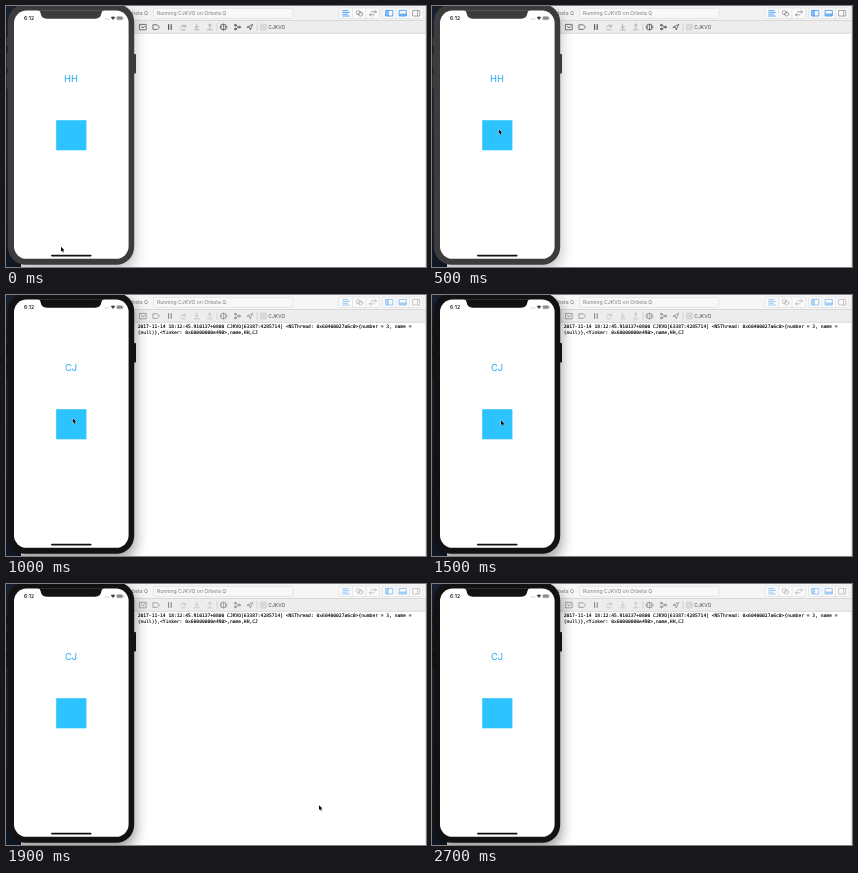
Recreate the animation shown at these times as an HTML page. Size 420x261 px, loop 3000 ms.

```html
<!DOCTYPE html>
<html lang="en">
<head>
<meta charset="utf-8">
<title>Observer demo</title>
<style>
  html, body { margin: 0; width: 100%; height: 100%; overflow: hidden; background: #fff; }
  svg { display: block; width: 100vw; height: 100vh; }
  text { font-family: Inter, Roboto, "Liberation Sans", sans-serif; white-space: pre; }
  .mono { font: 4.65px "DejaVu Sans Mono", "Liberation Mono", monospace; fill: #000; stroke: #000; stroke-width: .1; }
  .line { fill: none; stroke: #5a5a5a; stroke-width: .8; stroke-linejoin: round; stroke-linecap: round; }
  .dim { stroke: #a2a2a2; }
  .blue { stroke: #3494f4; }
  .gray { stroke: #929292; }
  .case { fill: #3c3c3c; }
  .bar { fill: #f2f2f2; }
  .shadow { opacity: .24; }
  .active .case { fill: #121212; }
  .active .bar { fill: #f6f6f6; }
  .active .shadow { opacity: .4; }
  .active .icons { opacity: .62; }
</style>
</head>
<body>
<svg id="stage" viewBox="0 0 420 261">
  <defs>
    <filter id="blur" x="-40%" y="-20%" width="180%" height="140%"><feGaussianBlur stdDeviation="7"/></filter>
    <linearGradient id="desk" x1="0" y1="0" x2="0" y2="1">
      <stop offset="0" stop-color="#1a2232"/>
      <stop offset=".45" stop-color="#1f2838"/>
      <stop offset="1" stop-color="#121a29"/>
    </linearGradient>
  </defs>

  <!-- desktop and editor window -->
  <rect width="16" height="261" fill="url(#desk)"/>
  <rect x="15" width="405" height="261" fill="#fff"/>
  <rect class="bar" x="15" width="405" height="14.5"/>
  <rect x="15" y="14.5" width="405" height="12.5" fill="#ededed"/>
  <path d="M15 14.5H420M15 27.3H420" stroke="#d2d2d2" stroke-width=".8"/>
  <path d="M419.6 0V261" stroke="#d2d2d2" stroke-width=".8"/>

  <!-- title bar -->
  <text x="142" y="9.4" font-size="5.1" fill="#777" text-anchor="end">Orbeta Q</text>
  <rect x="147.5" y="2.3" width="139.5" height="10" rx="1.5" fill="#f8f8f8" stroke="#dedede" stroke-width=".7"/>
  <text x="151" y="9.4" font-size="5.1" fill="#7b7b7b">Running CJKVO on Orbeta Q</text>
  <g fill="#fafafa" stroke="#dcdcdc" stroke-width=".6">
    <rect x="333" y="2" width="40.5" height="10.5" rx="1.5"/>
    <rect x="376.5" y="2" width="40.5" height="10.5" rx="1.5"/>
    <path d="M346.5 2V12.5M360 2V12.5M390 2V12.5M403.5 2V12.5"/>
  </g>
  <g class="icons">
    <path class="line blue" d="M336.7 4.6H342M336.7 6.4H343.5M336.7 8.2H341.5M336.7 10H343.5"/>
    <g class="line gray">
      <circle cx="352.3" cy="6.6" r="2.1"/><circle cx="354.6" cy="8" r="2.1"/>
      <path d="M363.5 8.8H368M363.5 8.8l1.5-1.4M363.5 8.8l1.5 1.4M365.5 5.8H370.4M370.4 5.8l-1.5-1.4M370.4 5.8l-1.5 1.4"/>
    </g>
    <g id="panels"></g>
  </g>

  <!-- debug bar -->
  <g class="line icons">
    <rect x="133.8" y="18.4" width="6.4" height="5.4"/>
    <path d="M135.4 20.2L137 22L138.6 20.2"/>
    <path d="M147.3 18.8H151.3L153.5 21.1L151.3 23.4H147.3Z"/>
    <path d="M162.6 18.7V23.5M165.2 18.7V23.5" stroke-width="1.2"/>
    <path class="dim" d="M174.7 21.2Q177 17 179.3 20.8M179.4 18.8V20.9H177.4M175.2 23.8H179"/>
    <path class="dim" d="M190.7 18V22M189.2 20.6L190.7 22.1L192.2 20.6M188.3 23.8H193.1"/>
    <path class="dim" d="M203.8 22.2V18M202.3 19.5L203.8 18L205.3 19.5M201.4 23.8H206.2"/>
    <path d="M215.6 18.7H219.6V23.5H215.6ZM214.4 20V22.2M220.8 20V22.2M217.6 17.8V24.4"/>
    <path d="M229.8 19.2L232.8 21.1L229.8 23M229.8 19.2H228.6M229.8 23H228.6M232.8 21.1H234"/>
    <circle cx="229.4" cy="19.2" r=".9"/><circle cx="229.4" cy="23" r=".9"/><circle cx="233.5" cy="21.1" r=".9"/>
    <path d="M241.2 21.2L246.8 18.2L244.2 24L243.7 21.6Z"/>
  </g>
  <path d="M211 17V25M251 17V25" stroke="#c6c6c6" stroke-width=".7"/>
  <rect x="254.3" y="18" width="6.2" height="6.2" rx=".8" fill="#d9d9d9" stroke="#c8c8c8" stroke-width=".5"/>
  <text x="262.3" y="23" font-size="5" fill="#4c4c4c">CJKVO</text>

  <!-- console output -->
  <g id="log">
    <text class="mono" x="131.7" y="33.2">2017-11-14 18:12:45.910137+0800 CJKVO[63387:4285714] &lt;NSThread: 0x60400027a6c0&gt;{number = 3, name =</text>
    <text class="mono" x="131.7" y="38.9">(null)},&lt;Yinker: 0x60000000e490&gt;,name,HH,CJ</text>
  </g>

  <!-- phone -->
  <rect class="shadow" x="2" y="3" width="127" height="263" rx="18" filter="url(#blur)"/>
  <g class="case">
    <rect x="127" y="48" width="3" height="19.5" rx=".8"/>
    <rect x=".6" y="31" width="3" height="9" rx=".8"/>
    <rect x=".6" y="47" width="3" height="16" rx=".8"/>
    <rect x=".6" y="67" width="3" height="16" rx=".8"/>
    <rect x="1.8" y="-2" width="126.4" height="260.8" rx="18"/>
  </g>
  <rect x="8" y="4.6" width="114.6" height="248.2" rx="12.5" fill="#fff"/>
  <path class="case" d="M31.5 4.3Q34.3 4.6 34.5 6.8Q35 12.7 41 12.7H89Q95 12.7 95.5 6.8Q95.7 4.6 98.5 4.3Z"/>
  <text x="18" y="14.2" font-size="5" font-weight="600" fill="#222">6:12</text>
  <g fill="#b5b5b5">
    <circle cx="99.5" cy="13" r=".6"/><circle cx="101.2" cy="13" r=".6"/><circle cx="102.9" cy="13" r=".6"/>
  </g>
  <path d="M104.7 11.3Q107 9.5 109.3 11.3L107 14Z" fill="#444"/>
  <rect x="110.8" y="10.6" width="5.8" height="3.2" rx=".9" fill="#8a8a8a" stroke="#b0b0b0" stroke-width=".5"/>
  <path d="M117.4 11.5V13" stroke="#999" stroke-width=".6"/>
  <text id="label" x="65" y="75.6" font-size="9.4" fill="#22a9f0" text-anchor="middle">HH</text>
  <rect x="50.2" y="114.2" width="30.2" height="30.1" fill="#2cc3ff"/>
  <rect x="45" y="248.8" width="40.6" height="1.6" rx=".8" fill="#111"/>

  <circle id="tap" cx="66.6" cy="123.2" r="9.2" fill="none" stroke="#24343d" stroke-width=".9"/>
  <path id="cursor" d="M0 0V4.7L1.1 3.7L1.9 5.6L2.8 5.2L2.1 3.4H3.5Z" fill="#050505" stroke="#fff" stroke-width=".6" paint-order="stroke"/>
</svg>
<script>
  const LOOP = 3000, STEP = 100;
  const TAP = 900, REPLY = 1000, GONE = 2700;

  // pointer tip: time, x, y
  const path = [
    [0, 55, 240.8], [100, 55.4, 234], [200, 58, 205], [300, 63, 162],
    [400, 66, 130], [500, 66.8, 123.4], [1400, 66.8, 123.4],
    [1500, 69, 125.4], [1600, 98, 139], [1700, 172, 172],
    [1800, 267, 208], [1900, 313, 221.2], [2000, 317, 223],
    [2200, 318, 226], [2400, 318, 226], [2500, 319, 234],
    [2600, 320, 250], [2700, 320, 264]
  ];

  const $ = id => document.getElementById(id);
  const show = (el, on) => el.setAttribute("visibility", on ? "visible" : "hidden");

  function tipAt(t) {
    const i = path.findIndex(p => p[0] > t);
    if (i < 0) return path[path.length - 1].slice(1);
    const [t0, x0, y0] = path[i - 1], [t1, x1, y1] = path[i];
    const k = (t - t0) / (t1 - t0);
    return [x0 + (x1 - x0) * k, y0 + (y1 - y0) * k];
  }

  // pane toggles: left and bottom are on, right is off
  const panes = [
    { x: 380, divider: "M2.2 0V5.6", fill: "M0 0H2.2V5.6H0Z", tone: "blue" },
    { x: 393.5, divider: "M0 3.7H6.8", fill: "M0 3.7H6.8V5.6H0Z", tone: "blue" },
    { x: 407, divider: "M4.6 0V5.6", fill: "", tone: "gray" }
  ];
  $("panels").innerHTML = panes.map(p =>
    `<g transform="translate(${p.x} 4.4)"><path d="${p.fill}" fill="#8fc4fa"/>` +
    `<path class="line ${p.tone}" d="M0 0H6.8V5.6H0Z${p.divider}"/></g>`).join("");

  function draw(now) {
    const t = Math.floor((now % LOOP) / STEP) * STEP;
    const replied = t >= REPLY;
    $("label").textContent = replied ? "CJ" : "HH";
    $("stage").setAttribute("class", replied ? "active" : "");
    show($("log"), replied);
    show($("tap"), t >= TAP && t < REPLY);
    show($("cursor"), t < GONE);
    $("cursor").setAttribute("transform", `translate(${tipAt(t)})`);
  }

  const start = performance.now();
  function tick() {
    draw(performance.now() - start);
    requestAnimationFrame(tick);
  }
  tick();
</script>
</body>
</html>
```
